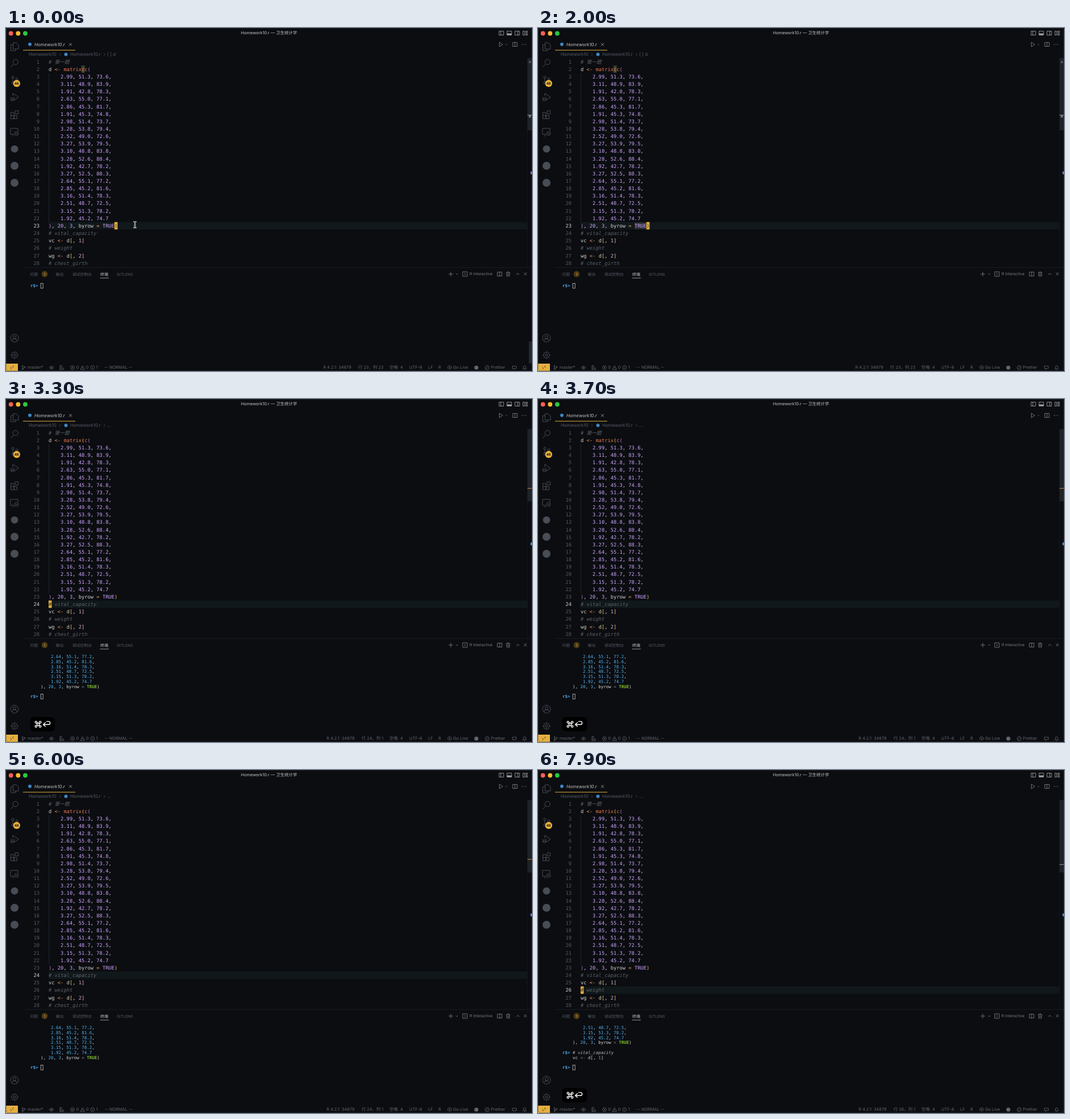
Write an HTML page that moves like this. It is 926 px wide and 605 px high and loops after 8 s.

```html
<!DOCTYPE html>
<html lang="zh">
<head>
<meta charset="utf-8">
<title>Editor</title>
<style>
html, body { margin: 0; width: 100%; height: 100%; overflow: hidden; background: #0b0d11; }
svg { display: block; width: 926px; height: 605px; }
text { white-space: pre; text-rendering: geometricPrecision; font-family: Inter, "Noto Sans CJK SC", "Noto Sans CJK", sans-serif; }
.mono { font-family: "DejaVu Sans Mono", "Noto Sans CJK SC", "Noto Sans CJK", monospace; }
.i { font-style: italic; }
.b { font-weight: 700; }
</style>
</head>
<body>
<svg id="stage" viewBox="0 0 926 605" xmlns="http://www.w3.org/2000/svg"></svg>
<script>
const BG = '#0b0d11', DIM = '#565b65', ICON = '#484c55', GOLD = '#e6b03f', LIGHT = '#d5d3cc';
const LOOP = 8000, RUN1 = 3200, RUN2 = 6500;

const rows = [
  [2.99, 51.3, 73.6], [3.11, 48.9, 83.9], [1.91, 42.8, 78.3], [2.63, 55.0, 77.1],
  [2.86, 45.3, 81.7], [1.91, 45.3, 74.8], [2.98, 51.4, 73.7], [3.28, 53.8, 79.4],
  [2.52, 49.0, 72.6], [3.27, 53.9, 79.5], [3.10, 48.8, 83.8], [3.28, 52.6, 88.4],
  [1.92, 42.7, 78.2], [3.27, 52.5, 88.3], [2.64, 55.1, 77.2], [2.85, 45.2, 81.6],
  [3.16, 51.4, 78.3], [2.51, 48.7, 72.5], [3.15, 51.3, 78.2], [1.92, 45.2, 74.7]
].map(([a, b, c], i) => `    ${a.toFixed(2)}, ${b.toFixed(1)}, ${c.toFixed(1)}${i < 19 ? ',' : ''}`);
const code = ['# 第一题', 'd <- matrix(c(', ...rows, '), 20, 3, byrow = TRUE)',
  '# vital_capacity', 'vc <- d[, 1]', '# weight', 'wg <- d[, 2]', '# chest_girth'];

// Small drawing helpers
const esc = s => s.replace(/&/g, '&amp;').replace(/</g, '&lt;').replace(/>/g, '&gt;');
const text = (x, y, s, fill = DIM, size = 7.5, cls = '', more = '') =>
  `<text x="${x}" y="${y}" fill="${fill}" font-size="${size}" class="${cls}" ${more}>${esc(s)}</text>`;
const rect = (x, y, w, h, fill, more = '') =>
  `<rect x="${x}" y="${y}" width="${w}" height="${h}" fill="${fill}" ${more}/>`;
const dot = (x, y, r, fill) => `<circle cx="${x}" cy="${y}" r="${r}" fill="${fill}"/>`;
const icon = (x, y, d, color = ICON, w = 1) =>
  `<path transform="translate(${x} ${y})" d="${d}" fill="none" stroke="${color}" stroke-width="${w}" stroke-linejoin="round"/>`;
const ring = (r, x = 0, y = 0) => `M${x - r} ${y}a${r} ${r} 0 1 0 ${2 * r} 0a${r} ${r} 0 1 0 ${-2 * r} 0`;
const box = (x, y, w, h) => `M${x} ${y}h${w}v${h}h${-w}z`;
const group = (id, body) => `<g id="${id}">${body}</g>`;

// Syntax colouring
const editorTheme = { comment: '#5d636b', num: '#d2a6ff', bool: '#d2a6ff', op: '#f29668', fn: '#f2764f',
  plain: LIGHT, brackets: ['#f5cb45', '#c678dd'] };
const termTheme = { comment: '#b5b5b2', num: '#53b5f5', bool: '#7fc02f', op: '#85888c', fn: '#d8d8d5',
  plain: '#d8d8d5', brackets: ['#d8d8d5', '#d8d8d5'] };
const token = /#.*|\d+(?:\.\d+)?|<-|=|TRUE|matrix|c(?=\()|[()\[\]]|[^#\d<=TmcC()\[\]]+|./g;
function kind(s) {
  if (s[0] === '#') return 'comment';
  if (/^\d/.test(s)) return 'num';
  if (s === 'TRUE') return 'bool';
  if (s === '<-' || s === '=') return 'op';
  return s === 'matrix' ? 'fn' : 'plain';
}
function painter(theme) {
  let depth = 0;
  return line => line.replace(token, (s, at) => {
    let k = kind(s), fill = theme[k];
    if (s === 'c' && line[at + 1] === '(') fill = theme.fn;
    if (/^[(\[]$/.test(s)) fill = theme.brackets[depth++ % 2];
    if (/^[)\]]$/.test(s)) fill = theme.brackets[--depth % 2];
    const cls = k === 'comment' ? 'i' : k === 'bool' && theme === termTheme ? 'b' : '';
    return `<tspan fill="${fill}" class="${cls}">${esc(s)}</tspan>`;
  });
}
const mono = (x, y, size, body) => `<text class="mono" x="${x}" y="${y}" font-size="${size}">${body}</text>`;

const SIZE = 8.75, CHAR = 5.268, LINE = 13.15;
const mid = n => 59.5 + (n - 1) * LINE;
const col = n => 75 + (n - 1) * CHAR;
const cursor = (id, n, c, ch) => group(id,
  rect(col(c), mid(n) - 6.5, CHAR + .2, 13, GOLD) + text(col(c), mid(n) + 3.1, ch, '#3a2d12', SIZE, 'mono'));

function editor() {
  const paint = painter(editorTheme);
  let out = rect(75, 79.5, .7, 263, '#2b2f36');
  code.forEach((line, i) => {
    const y = mid(i + 1) + 3.1;
    out += text(59, y, String(i + 1), '#555b64', SIZE, 'mono', 'text-anchor="end"') + mono(75, y, SIZE, paint(line));
  });
  return out;
}

// Terminal contents: '>' marks a prompt
function terminal(id, lines) {
  const paint = painter(termTheme);
  return group(id, lines.map((line, i) => {
    const y = 457.2 + i * 8.76, prompt = line[0] === '>';
    const body = prompt ? line.slice(1) : line;
    return (prompt ? text(43, y, 'r$>', '#4ba6ea', 7.5, 'mono b') : '') + mono(61, y, 7.5, paint(body)) +
      (prompt && !body ? rect(61.2, y - 6.8, 4, 8.6, 'none', 'stroke="#c9c9c6" stroke-width=".8"') : '');
  }).join(''));
}
// The earlier lines are off screen, so their opening brackets are too.
const tail = n => [...rows.slice(-n), '), 20, 3, byrow = TRUE)'];
termTheme.brackets[-1] = termTheme.brackets[-2] = '#d8d8d5';

const activeLine = (id, n) => group(id, rect(75, mid(n) - 6.5, 843, 13, '#11181b') +
  rect(40, mid(n) - 6, 20, 12, BG) + text(59, mid(n) + 3.1, String(n), '#b4b7ba', SIZE, 'mono', 'text-anchor="end"'));

const chevron = 'M-1.8 -.8L0 1L1.8 -.8', cross = 'M-2.4 -2.4L2.4 2.4M2.4 -2.4L-2.4 2.4';
const split = box(-4, -3.5, 8, 7) + 'M0 -3.5v7';

function titleBar() {
  const c = '#9a9ca0', f = box(-4, -3.5, 8, 7);
  return dot(8.7, 9.5, 3.9, '#ff5f57') + dot(21.3, 9.5, 3.9, '#febc2e') + dot(33.9, 9.5, 3.9, '#28c840') +
    text(463, 11.3, 'Homework10.r — 卫生统计学', '#c3c4c5', 7.4, '', 'text-anchor="middle"') +
    icon(872, 9, f + 'M-1 -3.5v7', c, .9) + icon(886, 9, f, c, .9) + rect(882, 9.5, 8, 3, c) +
    icon(900, 9, f + 'M1 -3.5v7', c, .9) +
    icon(914, 9, box(-4, -3.5, 3, 7) + box(1, -3.5, 3, 2.6) + box(1, 1, 3, 2.6), c, .9);
}

function activityBar() {
  let teeth = '';
  for (let a = 0; a < 8; a++) {
    const p = r => `${(r * Math.cos(a * Math.PI / 4)).toFixed(2)} ${(r * Math.sin(a * Math.PI / 4)).toFixed(2)}`;
    teeth += `M${p(5)}L${p(7)}`;
  }
  return icon(15, 33, 'M-2.5 -7h5.5l4 4v7h-9.5zM-2.5 -3.5h-4v10.5h8.5v-3') +
    icon(15, 62, ring(4.6, 1.8, -2) + 'M-1.5 1.3L-6.5 7') +
    icon(15, 92, ring(2, -3, -5) + ring(2, -3, 5) + ring(2, 4, -2) + 'M-3 -3v6M4 0q0 3-7 3') +
    dot(18.8, 97.8, 6.2, GOLD) + text(18.8, 100.1, '46', '#18140a', 6.2, 'b', 'text-anchor="middle"') +
    icon(15, 122, 'M-3 -2v-5L7 0L0 5' + ring(2.8, -3.5, 3.8) + 'M-7.5 4h8M-6 1l-1.5 -1M-1 1l1.5 -1') +
    icon(15, 153, box(-6.5, -4, 5.5, 5.5) + box(-6.5, 1.5, 5.5, 5.5) + box(-1, 1.5, 5.5, 5.5) + box(1.2, -7, 5.5, 5.5)) +
    icon(15, 183, 'M-1 4.5h-6v-10.5h13v5M-4 7h3' + ring(3.4, 3.5, 3) + 'M2 2l1.2 1.2L2 4.4M5.2 1.8L4 3l1.2 1.2') +
    dot(15, 213.3, 6.4, ICON) + dot(15, 243, 7, ICON) + dot(15, 273, 7, ICON) +
    icon(15, 547, ring(7) + ring(2.6, 0, -1.6) + 'M-4.6 5q1 -4 4.6 -4t4.6 4') +
    icon(15, 577, ring(5) + ring(2) + teeth);
}

function tabs() {
  return dot(42, 28.8, 3, '#3f86c4') + text(50, 31.5, 'Homework10.r', '#c6c7c7', 7.9, 'i') +
    icon(113.5, 29, cross, '#a0a2a5', .9) + rect(30, 38.6, 92, 1, GOLD) +
    icon(871, 29, 'M-2.5 -4L3.5 0L-2.5 4z', '#777b82', .9) + icon(881, 29, chevron, '#50545b', .8) +
    icon(896, 29, split, '#777b82', .9) + [908.7, 912, 915.3].map(x => dot(x, 29, .7, '#777b82')).join('') +
    text(40, 49.4, 'Homework10', DIM, 7.9) + icon(95, 46.6, 'M-1 -2L1 0L-1 2', DIM, .8) +
    dot(105.5, 46.6, 3, '#3f86c4') + text(113, 49.4, 'Homework10.r', DIM, 7.9) +
    icon(173.3, 46.6, 'M-1 -2L1 0L-1 2', DIM, .8);
}

function panel() {
  const c = '#777b82';
  return rect(30, 422, 896, .8, '#1c1f25') +
    text(42.3, 436.6, '问题', DIM, 6.9) + dot(68, 434, 5.4, '#4d3c17') +
    text(68, 436.5, '1', GOLD, 6.6, '', 'text-anchor="middle"') +
    text(87.5, 436.6, '输出', DIM, 6.9) + text(117, 436.6, '调试控制台', DIM, 6.8) +
    text(166, 436.6, '终端', LIGHT, 6.9) + rect(165.5, 440.6, 15.5, .8, '#b9b8b2') +
    text(195, 436.6, 'GITLENS', DIM, 6.8) +
    icon(783, 434, 'M-4 0h8M0 -4v8', c, .9) + icon(794, 434, chevron, c, .8) +
    icon(808, 434, box(-4, -4, 8, 8) + 'M-1.2 -2L1 0L-1.2 2', c, .9) +
    text(816, 436.4, 'R Interactive', '#777b82', 6.9) + icon(869, 434, split, c, .9) +
    icon(884, 434, 'M-3.6 -2.6h7.2M-1.2 -2.6v-1.3h2.4v1.3M-2.8 -2.6l.3 6.4h5l.3 -6.4M-.9 -1v3.4M.9 -1v3.4', c, .8) +
    icon(901, 434, 'M-2.8 1.4L0 -1.4L2.8 1.4', c, .9) + icon(914.3, 433.7, cross, c, .9);
}

function statusBar() {
  const at = (x, s) => text(x, 601.4, s, '#62666e', 7.4), small = (x, d) => icon(x, 599, d, '#62666e', .8);
  return rect(0, 592, 21, 13, GOLD) + icon(10.5, 598.7, 'M-3 -.6L-.6 1.2L-3 3.2M3 -3.2L.6 -1.4L3 .6', '#4b3a13', .8) +
    small(31, ring(1.1, -1.8, -2.5) + ring(1.1, -1.8, 2.5) + ring(1.1, 2, -1) + 'M-1.8 -1.4v2.8M2 .2q0 1.2 -3.8 1.2') +
    at(38, 'master*') + small(80, 'M-4 0q4 -5 8 0q-4 5 -8 0' + ring(1.2)) +
    small(98, 'M-3 -3.5h4M-3 -1h4M-3 1.5h2M-3 -3.5v7h3' + ring(1.6, 2, 2)) +
    small(117, ring(3.4) + 'M-1.4 -1.4l2.8 2.8M1.4 -1.4l-2.8 2.8') + at(123.5, '0') +
    small(134.7, 'M0 -3.4L3.8 3.2h-7.6zM0 -1v2.2') + at(140.8, '0') +
    small(152.3, ring(3.4) + 'M0 -.4v2M0 -1.9v.7') + at(158.7, '1') + at(173, '-- NORMAL --') +
    at(675, '空格: 4') + at(710, 'UTF-8') + at(743, 'LF') + at(761, 'R') +
    small(781, ring(1) + 'M-2.4 2.4a3.4 3.4 0 1 1 4.8 0M0 1v3') + at(787, 'Go Live') +
    dot(828, 599, 3.6, '#62666e') + small(847, ring(3.5) + 'M-2.4 2.4l4.8 -4.8') + at(853.5, 'Prettier') +
    small(895, 'M-3.5 -2.6h7v4h-3l-2 2v-2h-2z') +
    small(913, 'M-3.2 2h6.4l-1 -1.4v-1.6a2.2 2.2 0 0 0 -4.4 0v1.6zM-.9 3.4h1.8');
}
const place = (id, x1, s1, x2, s2) =>
  group(id, text(x1, 601.4, s1, '#62666e', 7.4) + text(x2, 601.4, s2, '#62666e', 7.4));

function keys() {
  const loop = [0, 90, 180, 270].map(a => `<path transform="rotate(${a})" d="M-3.6 -1.9H3.6M-1.9 -3.6a1.7 1.7 0 1 0 -1.7 1.7"/>`).join('');
  return group('keys', rect(42.8, 561, 43.2, 25.2, '#000', 'rx="6"') +
    '<g fill="none" stroke="#fff" stroke-width="1.4" stroke-linejoin="round" stroke-linecap="round">' +
    `<g transform="translate(56.5 573.7)">${loop}</g>` +
    '<path d="M69.3 570.8L65.6 574.2L69.3 577.6M65.9 574.2H74.8a2.7 2.7 0 0 0 0 -5.6H71.5"/></g>');
}

const beam = 'M-2.6 -5.2q2.6 0 2.6 1.6q0 -1.6 2.6 -1.6M0 -3.6v7.2M-2.6 5.2q2.6 0 2.6 -1.6q0 1.6 2.6 1.6M-1.5 .8h3';

stage.innerHTML = rect(0, 0, 926, 605, BG) +
  titleBar() + activityBar() + tabs() +
  group('symbol', text(178, 49.4, '[ ] d', DIM, 7.9)) + group('dots', text(178, 49.4, '...', DIM, 7.9)) +
  '<g id="lines"></g>' +
  group('brackets', rect(col(12), mid(2) - 6, CHAR, 12, '#34372b', 'stroke="#5b5a3a" stroke-width=".5"')) +
  group('word', rect(col(19), mid(23) - 6, CHAR * 4, 12, '#2a3034')) +
  editor() +
  activeLine('line23', 23) + activeLine('line24', 24) + activeLine('line26', 26) +
  cursor('cur23', 23, 23, ')') + cursor('cur24', 24, 1, '#') + cursor('cur26', 26, 1, '#') +
  rect(917.7, 53, .6, 369, '#1a1d22') + rect(918, 53, 8, 127.5, '#1f2227') +
  group('rule23', rect(920.5, 58, 3.5, 4, '#50545a') + rect(918, 153, 8, 1.2, '#85888c') + rect(920.5, 154, 3.5, 4, '#777a7e')) +
  group('rule24', rect(918, 157, 8, 1.2, '#b07b3c')) + group('rule26', rect(918, 166, 8, 1.2, '#85888c')) +
  '<rect id="edge" x="923.5" y="253" width="2.5" height="5"/>' +
  panel() +
  terminal('term0', ['>']) +
  terminal('term1', [...tail(6), '', '>']) +
  terminal('term2', [...tail(3), '', '># vital_capacity', 'vc <- d[, 1]', '', '>']) +
  group('thumb', rect(920.5, 553, 5.5, 38.5, '#25282d')) +
  statusBar() +
  place('pos23', 558.5, 'R 4.2.1: 34879', 620, '行 23，列 23') +
  place('pos24', 564.3, 'R 4.2.1: 34879', 625.8, '行 24，列 1') +
  place('pos26', 564.3, 'R 4.2.1: 34879', 625.8, '行 26，列 1') +
  keys() +
  group('mouse', icon(227, 347, beam, '#fff', 2) + icon(227, 347, beam, '#222', .8)) +
  rect(.25, .25, 925.5, 604.5, 'none', 'rx="5" stroke="#3a3c40" stroke-width=".5"');

// Highlight bars sit beneath the code text
const $ = id => document.getElementById(id);
for (const n of [23, 24, 26]) $('lines').append($('line' + n));
for (const n of [23, 24, 26]) {
  const num = $('line' + n).lastChild;
  num.previousSibling.remove();
  $('cur' + n).before(num);
  num.id = 'num' + n;
}

const show = (id, on) => { $(id).style.display = on ? '' : 'none'; };
const fade = (t, a, b) => Math.max(0, Math.min(1, (b - t) / (b - a)));

function frame() {
  const t = performance.now() % LOOP;
  const stageNo = t < RUN1 ? 0 : t < RUN2 ? 1 : 2;
  const since = t - [-100, RUN1, RUN2][stageNo];
  [23, 24, 26].forEach((n, i) => {
    const on = i === stageNo;
    for (const part of ['line', 'num', 'rule', 'pos']) show(part + n, on);
    show('cur' + n, on && since % 1000 < 500);
    show('term' + i, on);
  });
  show('symbol', !stageNo);
  show('dots', stageNo);
  show('brackets', !stageNo);
  show('word', !stageNo && t >= 200);
  show('mouse', t < 600);
  $('thumb').style.opacity = fade(t, 100, 800);
  $('edge').style.fill = t < 2800 ? '#8d7bd6' : '#5a9be0';
  $('keys').style.opacity = stageNo ? fade(since, 1850, 2200) : 0;
  requestAnimationFrame(frame);
}
frame();
</script>
</body>
</html>
```
